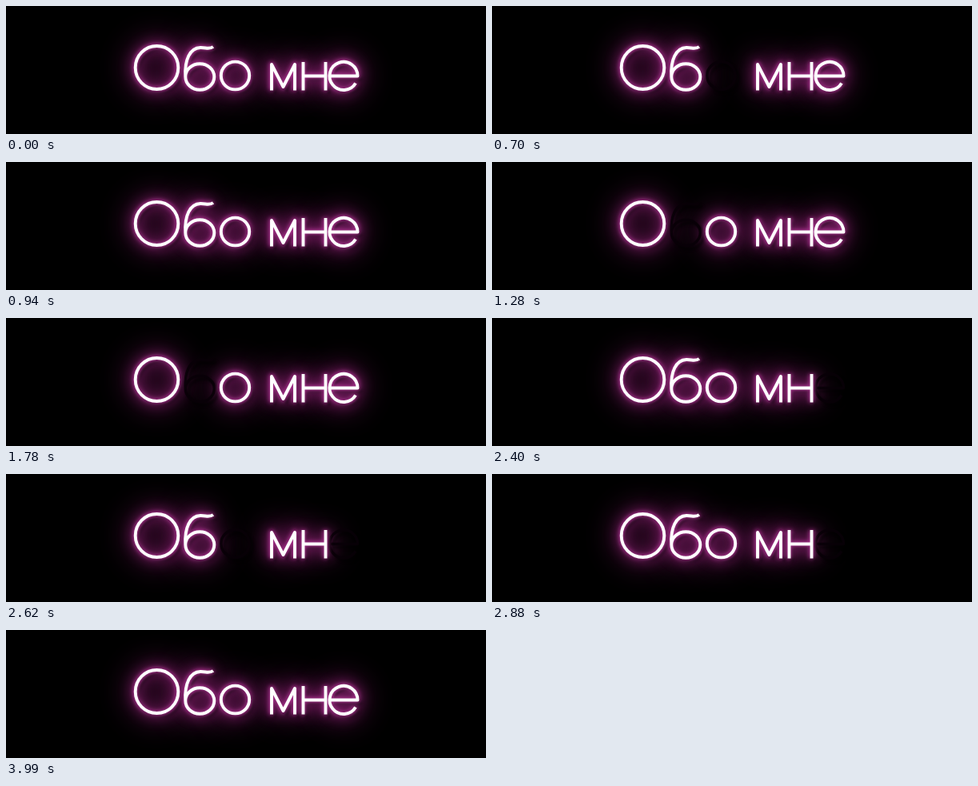
These frames come from a looping animation (600 px wide and 160 px high, 8000 ms). An HTML page:

```html
<!DOCTYPE html>
<html lang="ru">
<head>
<meta charset="utf-8">
<title>Обо мне</title>
<style>
html, body { margin: 0; width: 100%; height: 100%; overflow: hidden; background: #000; }
svg { display: block; width: 600px; height: 160px; }
path { fill: none; stroke-linejoin: round; }
.far { stroke: #6a1455; stroke-width: 26; opacity: .52; filter: blur(17px); }
.mid { stroke: #92287a; stroke-width: 11; opacity: .62; filter: blur(8px); }
.near { stroke: #c23aa2; stroke-width: 7; opacity: .72; filter: blur(2.4px); }
.shade { stroke: #000; stroke-width: 4; opacity: .5; transform: translate(4px, 4px); filter: blur(1.5px); }
.unlit { stroke: #080107; stroke-width: 3.5; opacity: .9; }
.tube { stroke: #fff; stroke-width: 3.9; }
</style>
</head>
<body>
<svg viewBox="0 0 600 160" role="img" aria-label="Обо мне"></svg>
<script>
const ring = (x, y, rx, ry) =>
  `M${x - rx} ${y}a${rx} ${ry} 0 1 1 ${2 * rx} 0a${rx} ${ry} 0 1 1 ${-2 * rx} 0Z`;

const letters = [
  ring(188.5, 77, 26.8, 27),
  ring(242.3, 88.5, 18, 16.2) + 'M224.3 88.5C223 67 230 52.5 243 52C250 51.8 254 54.5 259 51',
  ring(286.5, 87, 17.7, 17.4),
  'M332 105.5V73L346.5 101L361 73V105.5',
  'M371.5 70V105.5M399.5 70V105.5M371.5 87.5H399.5',
  'M405 87.5H439.5A17.5 17.6 0 1 0 437 96.5'
];

// A faulty letter switches on or off every STEP ms during each burst.
const LOOP = 8000, STEP = 20;
const bursts = [
  { letter: 2, from: 500, to: 760 },
  { letter: 1, from: 1040, to: 1280 },
  { letter: 1, from: 1500, to: 1580 },
  { letter: 1, from: 1780, to: 1920 },
  { letter: 2, from: 1940, to: 2120 },
  { letter: 5, from: 2320, to: 2600 },
  { letter: 2, from: 2620, to: 2880 },
  { letter: 5, from: 3990, to: 3990 }
];

const switches = ({ from, to }, t) =>
  t < from ? 0 : Math.floor((Math.min(t, to) - from) / STEP) + 1;

const isLit = (letter, t) => bursts
  .filter(b => b.letter === letter)
  .reduce((sum, b) => sum + switches(b, t), 0) % 2 === 0;

const layer = (...names) => letters.map((d, i) =>
  `<g data-letter="${i}">${names.map(n => `<path class="${n}" d="${d}"/>`).join('')}</g>`).join('');

const svg = document.querySelector('svg');
svg.innerHTML =
  `<g class="light">${layer('far', 'mid')}</g>` +
  layer('shade', 'unlit') +
  `<g class="light">${layer('near')}${layer('tube')}</g>`;
const lights = svg.querySelectorAll('.light [data-letter]');

const start = performance.now();
function frame() {
  const t = (performance.now() - start) % LOOP;
  for (const g of lights) g.style.opacity = +isLit(+g.dataset.letter, t);
  requestAnimationFrame(frame);
}
frame();
</script>
</body>
</html>
```
